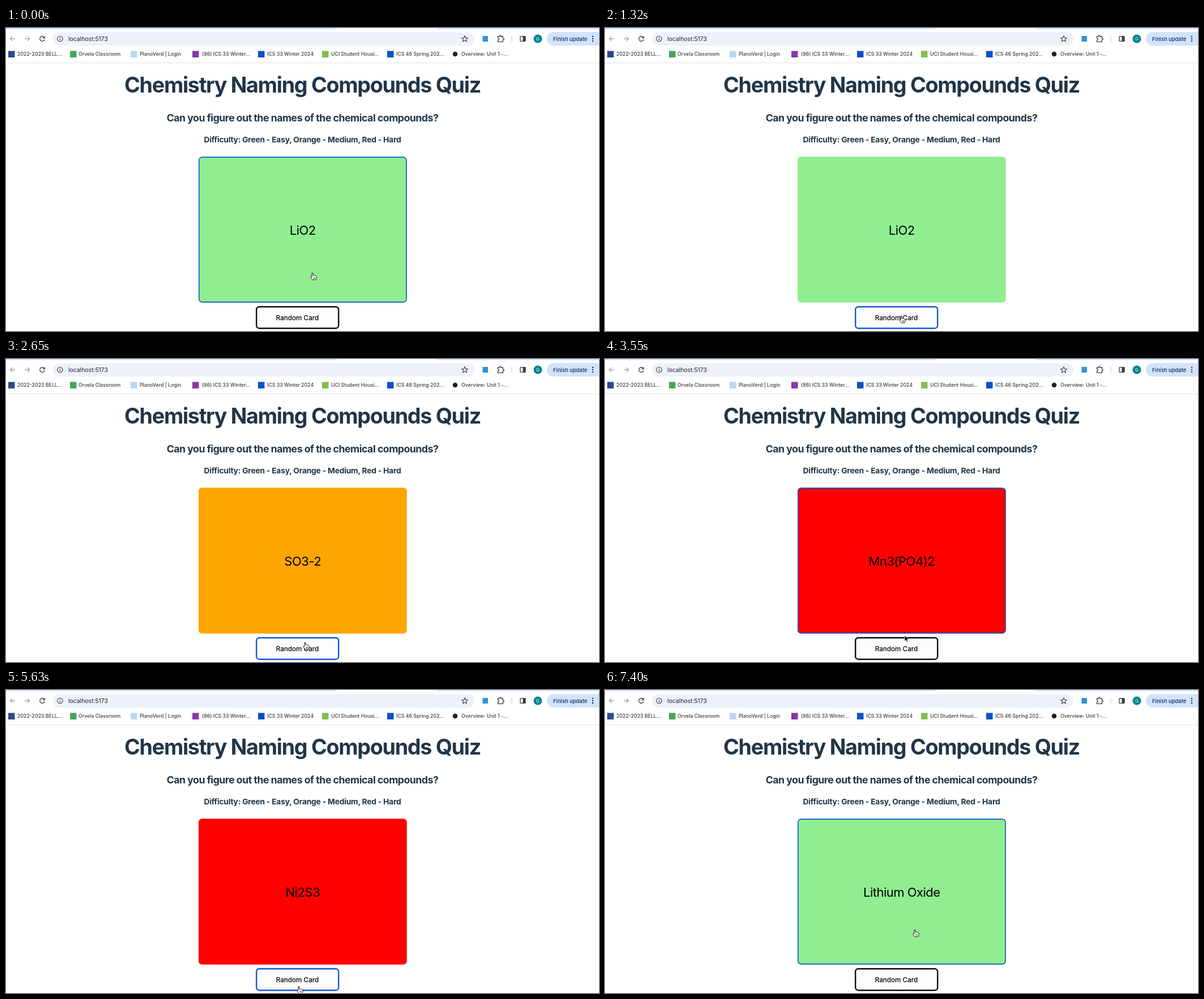
Write an HTML page that moves like this. It is 1047x535 px and loops after 7990 ms.

```html
<!DOCTYPE html>
<html lang="en">
<head>
<meta charset="utf-8">
<title>Chemistry Quiz</title>
<style>
  html, body { margin: 0; width: 100%; height: 100%; overflow: hidden; background: #fff; }
  svg { display: block; width: 1047px; height: 535px; font-family: Inter, "Open Sans", sans-serif; }
  .mid { text-anchor: middle; }
  .head { font-weight: 700; fill: #213547; }
  .icon { fill: none; stroke: #3c4043; stroke-width: 1.3; }
  #marks { font-size: 8.75px; font-weight: 500; fill: #3a3d42; }
</style>
</head>
<body>
<svg viewBox="0 0 1047 535">
  <!-- browser bar -->
  <path d="M0 0H585Q583 2 579 2H0ZM760 0H1047V2H766Q762 2 760 0Z" fill="#d3e3fd"/>
  <path d="M0 61.5H1047" stroke="#e2e5e9"/>
  <rect x="83" y="7.5" width="744" height="23.5" rx="11.75" fill="#edf1f9"/>
  <g class="icon">
    <path d="M16 19H7.5M11.3 15 7.3 19l4 4M33 19h8.500M37.700 15l4 4-4 4" stroke="#a5a8ac"/>
    <path d="M67.300 16.200A4.300 4.300 0 1 0 68.200 20.200M68.300 14.300V17.500H65"/>
    <circle cx="95.500" cy="19" r="4.700" stroke-width="1.100"/>
    <path d="M95.500 18.500v3M95.500 16.200v1.200" stroke-width="1.200"/>
    <path d="M810 13.800l1.500 3.500 3.800.3-2.900 2.500.9 3.700-3.300-2-3.300 2 .9-3.700-2.900-2.500 3.800-.3Z" stroke-width="1.100"/>
    <path d="M868.500 15h3q-.3-2 1.300-2t1.300 2h3.200v3.200q2 0 2 1.400t-2 1.400v3.300h-8.800v-3q2-.2 2-1.700t-2-1.700Z"/>
    <rect x="908" y="14.700" width="9" height="8.700" rx="1"/>
  </g>
  <rect x="912.500" y="14.500" width="4.700" height="9" fill="#3c4043"/>
  <rect x="841.500" y="14" width="9.500" height="10" fill="#3391dc"/>
  <path d="M893 13.500v11" stroke="#c6d8f5" stroke-width="1.300"/>
  <circle cx="939" cy="19" r="7.500" fill="#00838f"/>
  <text class="mid" x="939" y="21.800" font-size="7.800" fill="#fff">G</text>
  <rect x="955" y="7" width="100" height="24" rx="12" fill="#d3e3fd"/>
  <text x="966" y="22.500" font-size="9.400" font-weight="500" fill="#0b2a5c">Finish update</text>
  <g fill="#0b2a5c"><circle cx="1036" cy="15" r="1.200"/><circle cx="1036" cy="19" r="1.200"/><circle cx="1036" cy="23" r="1.200"/></g>
  <text x="110" y="22.800" font-size="10.400" fill="#202124">localhost:5173</text>
  <g id="marks"></g>

  <!-- page -->
  <g class="mid head">
    <text x="523.500" y="113.500" font-size="37.700" letter-spacing="-.035em">Chemistry Naming Compounds Quiz</text>
    <text x="523.500" y="165" font-size="17.700" letter-spacing="-.028em">Can you figure out the names of the chemical compounds?</text>
    <text x="523.500" y="201.700" font-size="13.800" letter-spacing="-.015em">Difficulty: Green - Easy, Orange - Medium, Red - Hard</text>
  </g>
  <rect x="340" y="227.300" width="367.700" height="257.400" rx="6" id="card"/>
  <rect x="340.800" y="228.100" width="366.100" height="255.800" rx="5.500" fill="none" stroke="#0d5bcb" stroke-width="1.600" id="ring"/>
  <text class="mid" x="523.800" y="364.600" font-size="22.100" letter-spacing="-.025em" id="label"></text>
  <rect x="442.200" y="492.200" width="145" height="38" rx="5" stroke-width="2.400" id="button"/>
  <text class="mid" x="514.500" y="515.800" font-size="11.700" font-weight="500">Random Card</text>
  <g id="cursor">
    <path id="hand" d="M-1 .8Q0-.6 1 .8V4.800Q2.200 3.900 3.300 5Q4.500 4.400 5.300 5.500Q7 5.100 7.100 6.800V9.200Q6.800 11 5.800 12.600H.2Q-1.200 10.600-3 8.600Q-3.900 7.200-2.600 6.800Q-1.600 6.900-1 7.800ZM2.200 8.300v2.500M4.200 8.300v2.500" fill="#fff" stroke="#000" stroke-width=".9" stroke-linejoin="round"/>
    <path id="arrow" d="M0 0V10.500L2.400 8.300 4 12 5.800 11.200 4.200 7.600H7.400Z" stroke="#fff" stroke-width=".8"/>
  </g>
</svg>
<script>
const $ = id => document.getElementById(id);
const LOOP = 7990, STEPS = 54;
const GREEN = '#90ee90', ORANGE = '#ffa500', RED = '#ff0000';

// icon x, text x, icon colour, title
const bookmarks = [
  [4, 20, '#2b4a8b', '2022-2023 BELL…'],
  [113, 128, '#45a65a', 'Orvela Classroom'],
  [220, 236, '#b9d7f4', 'PlanoVerd | Login'],
  [329, 346, '#8639a8', '(86) ICS 33 Winter…'],
  [445, 461, '#0a50c8', 'ICS 33 Winter 2024'],
  [558, 574, '#82bd52', 'UCI Student Housi…'],
  [673, 689, '#0a50c8', 'ICS 46 Spring 202…'],
  [788, 804, '#202020', 'Overview: Unit 1 -…']
];
$('marks').innerHTML = bookmarks.map(([ix, tx, color, title], i) => {
  const icon = i < 7
    ? `<rect x="${ix}" y="40.5" width="11.5" height="11.5" fill="${color}"/>`
    : `<circle cx="${ix + 5}" cy="46" r="4.300" fill="${color}"/>`;
  return `${icon}<text x="${tx}" y="49.300">${title}</text>`;
}).join('');

// Each round lists the steps at which things happen to its card.
const round = (formula, name, color, deal, focus, flip, back, press) =>
  ({ formula, name, color, deal, focus, flip, back, press });
const rounds = [
  round('LiO2', 'Lithium Oxide', GREEN, 0, 0, 1, 3, 8),
  round('SO3-2', 'Sulfite', ORANGE, 9, 11, 11, 14, 17),
  round('Mn3(PO4)2', 'Manganese(II) Phosphate', RED, 18, 20, 20, 22, 27),
  round('Ni2S3', 'Nickel(III) Sulfide', RED, 28, 31, 32, 34, 38),
  round('NaBr', 'Sodium Bromide', GREEN, 39, 41, 42, 44, 46),
  round('LiO2', 'Lithium Oxide', GREEN, 47, 49, 50, 54, 54)
];

// Pointer path: step, x, y
const path = [
  [0, 541, 432], [3, 541, 432], [5, 538, 462], [7, 523, 508], [9, 523, 508],
  [11, 539, 455], [13, 539, 455], [14, 539, 457], [16, 528, 500], [18, 528, 500],
  [20, 533, 455], [21, 533, 455], [24, 529, 488], [25, 529, 488], [26, 525, 505],
  [28, 525, 505], [31, 536, 445], [34, 536, 445], [36, 522, 500], [38, 517, 523],
  [39, 517, 523], [41, 545, 430], [43, 545, 430], [44, 545, 481], [45, 540, 505],
  [47, 540, 505], [49, 547, 423], [54, 547, 423]
];

function pointer(step) {
  const i = path.findIndex(p => p[0] > step);
  const [s0, x0, y0] = path[i - 1], [s1, x1, y1] = path[i];
  const u = (step - s0) / (s1 - s0);
  return [x0 + (x1 - x0) * u, y0 + (y1 - y0) * u];
}

function set(id, attrs) {
  for (const key in attrs) $(id).setAttribute(key, attrs[key]);
}

function draw(step) {
  const r = rounds.findLast(r => r.deal <= step);
  const cardFocus = step >= r.focus && step < r.press;
  const [x, y] = pointer(step);
  const overButton = x > 441 && x < 588 && y > 491 && y < 531;
  const clickable = overButton || y < 485;

  $('label').textContent = step >= r.flip && step < r.back ? r.name : r.formula;
  set('card', { fill: r.color });
  set('ring', { opacity: +cardFocus });
  set('button', {
    fill: overButton && cardFocus ? '#f7f7f7' : '#fdfdfd',
    stroke: !cardFocus ? '#1659cf' : overButton ? '#646cff' : '#0d0d0d'
  });
  set('cursor', { transform: `translate(${x} ${y})` });
  set('hand', { opacity: +clickable });
  set('arrow', { opacity: +!clickable });
}

function tick() {
  const t = performance.now() % LOOP;
  draw(Math.min(STEPS - 1, Math.floor((t + 9) * STEPS / LOOP)));
  requestAnimationFrame(tick);
}
tick();
</script>
</body>
</html>
```
